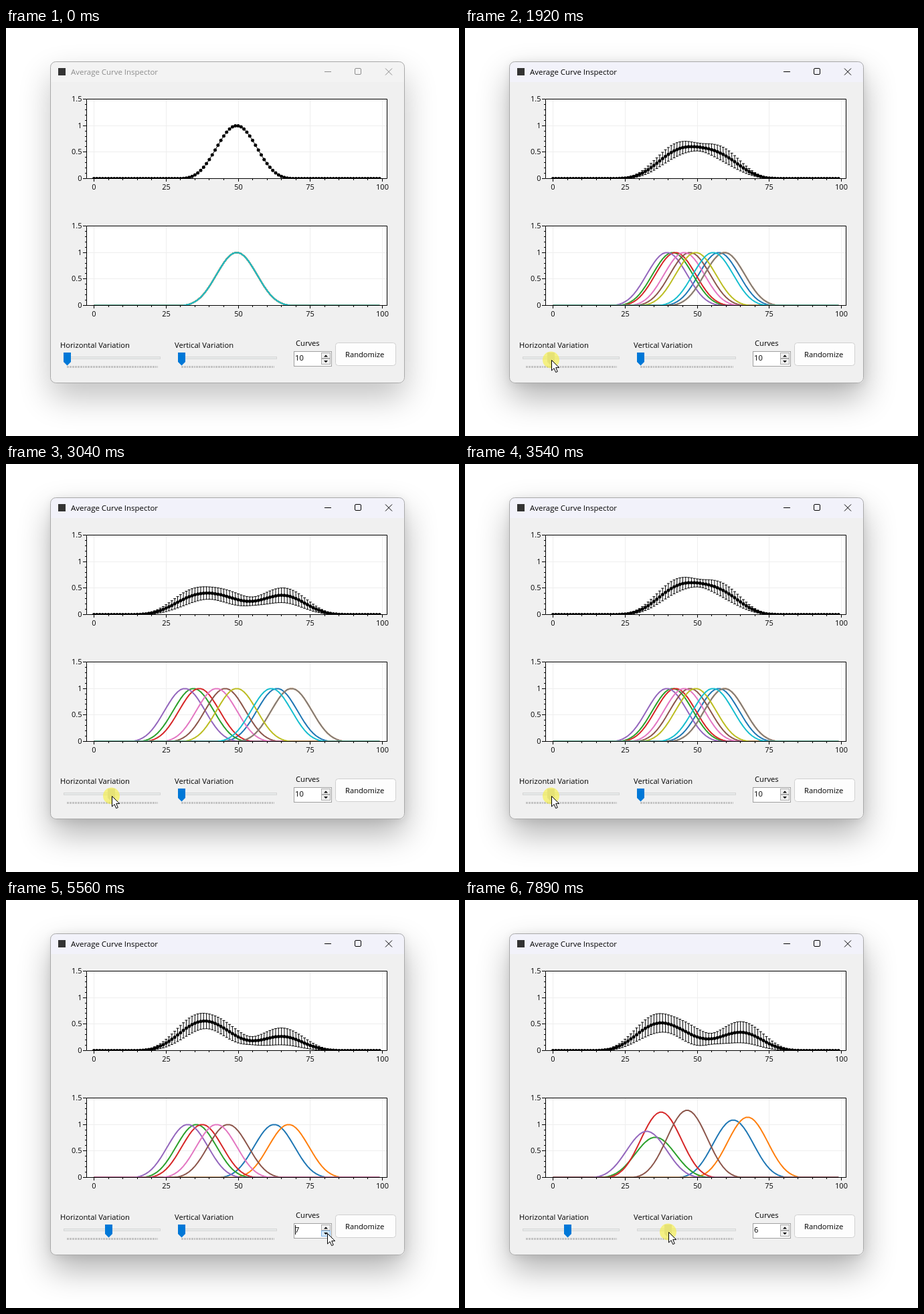
Animation, 677 px wide and 611 px high, one loop 8000 ms. Source, as an HTML page:

```html
<!DOCTYPE html>
<html lang="en">
<head>
<meta charset="utf-8">
<title>Average Curve Inspector</title>
<style>
  html, body { margin: 0; width: 100%; height: 100%; overflow: hidden; background: #fff; }
  #window { position: absolute; left: 67px; top: 50px; width: 529px; height: 482px; border-radius: 8px;
    box-shadow: 0 22px 48px rgba(0,0,0,.24); }
  #window.active { box-shadow: 0 22px 48px rgba(0,0,0,.3), 0 2px 14px rgba(0,0,0,.08); }
  svg { position: absolute; left: 0; top: 0; display: block; }
  text { font: 11.2px "Open Sans", "Noto Sans", sans-serif; }
  #title { font-size: 11.450px; }
  .axis text { font-size: 11px; }
</style>
</head>
<body>
<div id="window"></div>
<svg id="stage" width="677" height="611" viewBox="0 0 677 611">
  <rect x="67" y="50" width="529" height="482" rx="8" fill="#f0f0f0"/>
  <path id="titleBar" d="M67 81V58a8 8 0 0 1 8-8H588a8 8 0 0 1 8 8V81z"/>
  <rect x="66.5" y="50.5" width="529" height="481" rx="8" fill="none" stroke="#a9a9a9"/>
  <rect x="78" y="60" width="11" height="11" fill="#333"/>
  <text id="title" x="97" y="70">Average Curve Inspector</text>
  <g id="buttons" fill="none">
    <path d="M476 65.5h10M567 60.5l10 10M577 60.5l-10 10"/>
    <rect x="521.5" y="60.5" width="9" height="9" rx="1.5"/>
  </g>

  <clipPath id="topClip"><rect x="120" y="106" width="450" height="120"/></clipPath>
  <clipPath id="bottomClip"><rect x="120" y="296" width="450" height="120"/></clipPath>
  <g id="grids"></g>
  <g clip-path="url(#topClip)" fill="none" stroke="#000">
    <path id="errors"/>
    <path id="mean"/>
    <path id="dots" stroke-width="5" stroke-linecap="round"/>
  </g>
  <g id="axes" class="axis"></g>
  <g id="curves" clip-path="url(#bottomClip)" fill="none" stroke-width="2" stroke-linejoin="round"></g>
  <path d="M120 415.5h450" stroke="#000"/>

  <text x="81" y="479">Horizontal Variation</text>
  <text x="252" y="479">Vertical Variation</text>
  <text x="433" y="476">Curves</text>
  <g fill="#e7eaea" stroke="#d6d6d6">
    <rect x="86.5" y="492.5" width="144" height="3"/>
    <rect x="257.5" y="492.5" width="147" height="3"/>
  </g>
  <g id="sliderTicks" stroke="#c4c4c4"></g>
  <path id="handleH" d="M-5.5 486h11v14l-5.5 5.5-5.5-5.5z"/>
  <path id="handleV" d="M-5.5 486h11v14l-5.5 5.5-5.5-5.5z"/>

  <rect x="430.5" y="484.5" width="56" height="22" fill="#fff" stroke="#a0a0a0"/>
  <text id="count" x="432" y="498"></text>
  <path id="caret" d="M432.5 487v14" stroke="#000"/>
  <rect x="471.5" y="486.5" width="13" height="8" fill="#f0f0f0" stroke="#adadad"/>
  <rect id="spinDown" x="471.5" y="495.5" width="13" height="8"/>
  <path d="M475 492.5l3-3 3 3zM475 498l3 3 3-3z"/>
  <rect x="492.5" y="471.5" width="90" height="34" rx="4" fill="#fdfdfd" stroke="#d0d0d0"/>
  <text x="507" y="493">Randomize</text>

  <circle id="halo" r="12.5" fill="#f6f03a" opacity=".6"/>
  <path id="cursor" d="M.5 .5V16l3.6-3.4 2.6 6 2.6-1.1-2.6-5.9h5z" fill="#fff" stroke="#000"/>
</svg>
<script>
const LOOP = 8000, STEP = 100.8;      // the screen updates about ten times a second
const POINTS = 100, BELL = 19.5, UNIT = 119 / 1.5;
const GRAB_H = 1100, DROP_H = 4030, GRAB_V = 6500;
const FIRST_CLICK = 4740, CLICK_GAP = 330, CLICKS = 4;

// Slider values as [time, percent]
const H_KEYS = [[GRAB_H, 0], [1310, 4.2], [2420, 47], [2820, 57], [2940, 57], [3340, 20], [3540, 28], [3940, 46]];
const V_KEYS = [[GRAB_V, 0], [6950, 53], [7200, 84], [7860, 29.7]];

// Colour, sideways share of H, height share of V
const CURVES = [
  ['#1f77b4', .292, .285], ['#ff7f0e', .3915, .465], ['#2ca02c', -.31, -.81],
  ['#d62728', -.28, .79], ['#9467bd', -.376, -.435], ['#8c564b', -.086, .905],
  ['#e377c2', -.16], ['#7f7f7f', .3915], ['#bcbd22', 0], ['#17becf', .245]
];

const ENTRY = [538, 598], GRIP_H = [97, 497], LEFT_H = [154, 497], SPINNER = [480, 499], GRIP_V = [264, 497];
const MOVES = [
  { start: 100, end: 790, from: ENTRY, to: GRIP_H, sag: 0 },
  { start: DROP_H, end: 4700, from: LEFT_H, to: SPINNER, sag: 11 },
  { start: 5850, end: 6270, from: SPINNER, to: GRIP_V, sag: 9 }
];

const $ = id => document.getElementById(id);
function add(parent, tag, attrs, text) {
  const el = document.createElementNS('http://www.w3.org/2000/svg', tag);
  for (const k in attrs) el.setAttribute(k, attrs[k]);
  if (text !== undefined) el.textContent = text;
  parent.append(el);
  return el;
}
const set = (id, attrs) => { for (const k in attrs) $(id).setAttribute(k, attrs[k]); };
const show = (id, on) => set(id, { visibility: on ? 'visible' : 'hidden' });
const clamp = (v, lo, hi) => Math.min(hi, Math.max(lo, v));
const mix = (a, b, u) => a + (b - a) * u;
const ease = u => u * u * (3 - 2 * u);

function at(t, keys) {
  const i = keys.findIndex(([time]) => time >= t);
  if (i < 0) return keys[keys.length - 1][1];
  if (i === 0) return keys[0][1];
  const [t0, v0] = keys[i - 1], [t1, v1] = keys[i];
  return mix(v0, v1, (t - t0) / (t1 - t0));
}

function pointer(t) {
  const { start, end, from, to, sag } = MOVES.filter(m => m.start <= t).pop() || MOVES[0];
  const u = ease(clamp((t - start) / (end - start), 0, 1));
  return [mix(from[0], to[0], u), mix(from[1], to[1], u) + sag * Math.sin(Math.PI * u)];
}

const px = x => 131.5 + 4.31 * x;
const py = (v, base) => base - UNIT * v;

function blackman(d) {
  if (Math.abs(d) >= BELL) return 0;
  const a = Math.PI * d / BELL;
  return .42 + .5 * Math.cos(a) + .08 * Math.cos(2 * a);
}

function polyline(values, base) {
  return 'M' + values.map((v, x) => px(x).toFixed(2) + ' ' + py(v, base).toFixed(2)).join('L');
}

function buildPlot(base) {
  const top = base - 119;
  add($('grids'), 'rect', { x: 120, y: top, width: 450, height: 120, fill: '#fff' });
  let grid = '', ticks = '';
  const label = (x, y, anchor, s) => add($('axes'), 'text', { x, y, 'text-anchor': anchor }, s);
  for (let i = 0; i <= 20; i++) {
    const x = Math.floor(px(i * 5)) + .5, major = i % 5 === 0;
    ticks += `M${x} ${base + .5}v${major ? 4 : 2}`;
    if (major) {
      grid += `M${x} ${top}v119`;
      label(x, base + 16.5, 'middle', i * 5);
    }
  }
  for (let i = 0; i <= 15; i++) {
    const y = Math.floor(py(i / 10, base) + .01) + .5, major = i % 5 === 0;
    ticks += `M120 ${y}h${major ? -5 : -2}`;
    if (major) {
      grid += `M120 ${y}h450`;
      label(113.5, y + 3.5, 'end', i / 10);
    }
  }
  add($('grids'), 'path', { d: grid, stroke: '#eee' });
  add($('axes'), 'path', { d: `M120.5 ${top}h449v119h-449z${ticks}`, fill: 'none', stroke: '#000' });
}

function buildSliderTicks(left, pitch) {
  let d = '';
  for (let i = 0; i <= 100; i++) d += `M${Math.floor(left + i * pitch) + .5} 506v3`;
  add($('sliderTicks'), 'path', { d });
}

buildPlot(225.5);
buildPlot(415.5);
buildSliderTicks(91, 1.35);
buildSliderTicks(262, 1.38);
const lines = CURVES.map(([stroke]) => add($('curves'), 'path', { stroke }));

function drawPlots(n, h, v) {
  const data = CURVES.slice(0, n).map(([, shift, rise = 0]) => {
    const centre = 49.5 + Math.trunc(shift * h), height = 1 + rise * v / 100;
    return Array.from({ length: POINTS }, (_, x) => height * blackman(x - centre));
  });
  lines.forEach((line, i) => line.setAttribute('d', i < n ? polyline(data[i], 415.5) : ''));

  const mean = [];
  let errors = '', dots = '';
  for (let x = 0; x < POINTS; x++) {
    const column = data.map(c => c[x]);
    const m = column.reduce((a, b) => a + b) / n;
    const variance = column.reduce((a, b) => a + (b - m) ** 2, 0) / n;
    const err = Math.sqrt(variance / n);
    const X = px(x), high = py(m + err, 225.5), low = py(m - err, 225.5);
    mean.push(m);
    errors += `M${X} ${high}V${low}M${X - 2} ${high}h4M${X - 2} ${low}h4`;
    dots += `M${X} ${py(m, 225.5)}h.01`;
  }
  set('errors', { d: errors });
  set('mean', { d: polyline(mean, 225.5) });
  set('dots', { d: dots });
}

function drawWindow(active) {
  $('window').classList.toggle('active', active);
  set('titleBar', { fill: active ? '#f2f2fa' : '#f3f3f3' });
  set('title', { fill: active ? '#000' : '#8c8c8c' });
  set('buttons', { stroke: active ? '#000' : '#8c8c8c' });
}

function drawHandle(id, x, dragged, mouseX, mouseY) {
  const hot = Math.abs(mouseX - x) < 7 && Math.abs(mouseY - 496) < 9;
  set(id, { transform: `translate(${Math.floor(x) + .5})`, fill: dragged ? '#ccc' : hot ? '#171717' : '#0078d7' });
}

function render(time) {
  const t = Math.floor(time / STEP) * STEP;
  const h = at(t, H_KEYS), v = at(t, V_KEYS);
  const xH = 91.5 + 1.35 * h, xV = 262.5 + 1.38 * v;
  const dragH = t >= GRAB_H && t < DROP_H, dragV = t >= GRAB_V;

  const sinceClick = t - FIRST_CLICK;
  const clicks = clamp(Math.floor(sinceClick / CLICK_GAP) + 1, 0, CLICKS);
  const clicking = sinceClick >= 0 && sinceClick < CLICKS * CLICK_GAP && sinceClick % CLICK_GAP < 100;

  let [x, y] = pointer(t);
  if (dragH) x = xH + .5;
  if (dragV) x = xV + .5;
  x = Math.round(x);
  y = Math.round(y);
  const overSpin = x > 471 && x < 486 && y > 494 && y < 505;

  drawWindow(t >= GRAB_H);
  drawPlots(10 - clicks, h, v);
  drawHandle('handleH', xH, dragH, x, y);
  drawHandle('handleV', xV, dragV, x, y);
  $('count').textContent = 10 - clicks;
  show('caret', clicks > 0 && !dragV && sinceClick % 1060 > 530);
  set('spinDown', { fill: overSpin ? '#d8eaf9' : '#f0f0f0', stroke: overSpin ? '#7eb4ea' : '#adadad' });
  set('cursor', { transform: `translate(${x} ${y})` });
  set('halo', { cx: x - .5, cy: y });
  show('cursor', t >= MOVES[0].start);
  show('halo', dragH || dragV || clicking);
}

const start = performance.now();
function loop() {
  render((performance.now() - start) % LOOP);
  requestAnimationFrame(loop);
}
loop();
</script>
</body>
</html>
```
